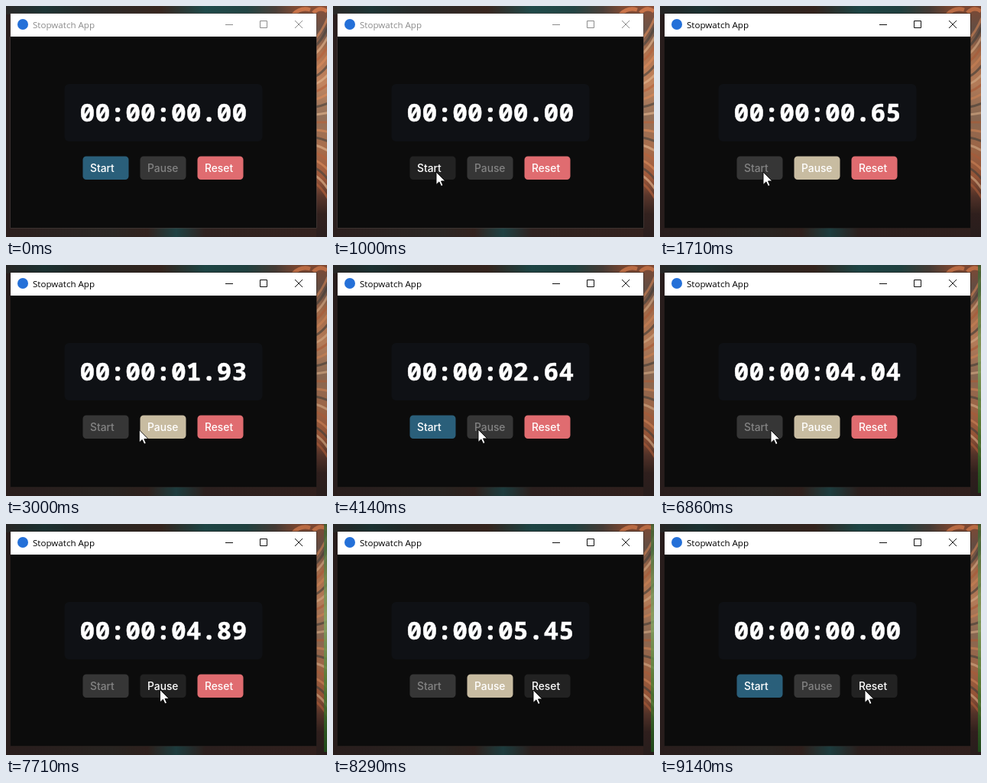
These frames come from a looping animation (420 by 302 pixels, 9.43 s). An HTML page:

```html
<!DOCTYPE html>
<html lang="en">
<head>
<meta charset="utf-8">
<title>Stopwatch App</title>
<style>
html, body { margin: 0; width: 100%; height: 100%; overflow: hidden; background: #251918; }
svg { display: block; width: 100%; height: 100%; }
text { white-space: pre; }
.title { font: 11.6px "Open Sans", sans-serif; }
.clock { font: bold 33px "Noto Sans Mono", monospace; letter-spacing: .1px; fill: #fff; stroke: #fff; stroke-width: .5; }
.label { font: 500 13.8px Inter, sans-serif; }
</style>
</head>
<body>
<svg viewBox="0 0 420 302">
  <defs>
    <linearGradient id="top">
      <stop offset="0" stop-color="#2a2827"/>
      <stop offset=".12" stop-color="#1d3535"/>
      <stop offset=".25" stop-color="#272a29"/>
      <stop offset=".48" stop-color="#38261f"/>
      <stop offset=".62" stop-color="#1f4a4a"/>
      <stop offset=".75" stop-color="#234544"/>
      <stop offset=".84" stop-color="#4a3f39"/>
      <stop offset=".9" stop-color="#7d4b35"/>
      <stop offset="1" stop-color="#8a4f37"/>
    </linearGradient>
    <linearGradient id="bottom">
      <stop offset="0" stop-color="#2c1f1e"/>
      <stop offset=".33" stop-color="#2b2724"/>
      <stop offset=".44" stop-color="#33231f"/>
      <stop offset=".53" stop-color="#1f4143"/>
      <stop offset=".62" stop-color="#2f2220"/>
      <stop offset="1" stop-color="#35231f"/>
    </linearGradient>
    <linearGradient id="side" x2="0" y2="1">
      <stop offset="0" stop-color="#8a4f37"/>
      <stop offset=".1" stop-color="#6a5349"/>
      <stop offset=".2" stop-color="#b0734f"/>
      <stop offset=".34" stop-color="#c2855f"/>
      <stop offset=".48" stop-color="#927059"/>
      <stop offset=".6" stop-color="#a86f4e"/>
      <stop offset=".74" stop-color="#a15a3b"/>
      <stop offset=".82" stop-color="#5a372c"/>
      <stop offset=".9" stop-color="#33221f"/>
      <stop offset="1" stop-color="#2b1f1e"/>
    </linearGradient>
    <linearGradient id="glow" x2="0" y2="1">
      <stop offset="0" stop-color="#3d6a35"/>
      <stop offset=".42" stop-color="#8fb56c"/>
      <stop offset=".7" stop-color="#4f8a38"/>
      <stop offset="1" stop-color="#1f5a1c"/>
    </linearGradient>
  </defs>

  <rect width="420" height="302" fill="#2b1f1e"/>
  <rect width="420" height="11" fill="url(#top)"/>
  <rect y="290" width="420" height="12" fill="url(#bottom)"/>
  <rect x="406" width="14" height="302" fill="url(#side)"/>
  <path d="M376 11Q386 1 398 5M402 9Q411 0 420 7" fill="none" stroke="#c9744a" stroke-width="5"/>
  <g id="fan" fill="none"></g>
  <rect id="strip" x="416" width="4" height="298" fill="url(#glow)" opacity=".8"/>
  <rect id="shade" width="420" height="302" fill="#000"/>

  <rect id="frame" x="5.5" y="9.5" width="401" height="281"/>
  <rect x="6" y="40" width="400" height="250" fill="#0c0c0c"/>
  <rect x="6" y="10" width="400" height="30" fill="#fff"/>
  <circle cx="22" cy="24" r="7" fill="#2470d8"/>
  <text id="title" class="title" x="35" y="29">Stopwatch App</text>
  <path id="controls" d="M287 24.5h10M332.5 19.5h9v9h-9zM378 19l10 10M388 19l-10 10" fill="none"/>

  <rect x="76.5" y="102" width="259" height="75" rx="6" fill="#0f1115"/>
  <text id="clock" class="clock" x="96.5" y="151"></text>
  <g id="buttons"></g>
  <path id="cursor" d="M0 0V16.5L3.9 12.9L6.5 18.6L9 17.5L6.5 11.9H11.8Z" fill="#fff" stroke="#000" stroke-width=".9"/>
</svg>
<script>
const LOOP = 9430, STEP = 1000 / 7, RATE = 0.993;
const START = 1054.7, PAUSE = 3710, RESUME = 5446.3, RESET = 8710;
const BUTTON_Y = 196.5, BUTTON_W = 60, BUTTON_H = 30.5;
const $ = id => document.getElementById(id);

// time, x, y
const PATH = [
  [350, 152, 306], [930, 135, 217], [2450, 135, 217], [3300, 190, 215],
  [4800, 190, 215], [5330, 145, 216], [7250, 145, 216], [8200, 262, 217],
  [8750, 262, 217], [9130, 268, 217]
];

function make(tag, parent, attrs) {
  const el = document.createElementNS("http://www.w3.org/2000/svg", tag);
  for (const key in attrs) el.setAttribute(key, attrs[key]);
  return parent.appendChild(el);
}

// Feathers of the wallpaper, spreading from behind the window
const FEATHERS = ["#d88a5a", "#4a443d", "#e0b48e", "#b5633d"];
for (let i = 0; i < 20; i++) {
  const y = 42 + i * 10, tilt = (i - 11) * 2.4;
  make("path", $("fan"), {
    d: `M405 ${y}Q413 ${y + tilt * 0.3} 421 ${y + tilt}`,
    stroke: FEATHERS[i % 4], "stroke-width": 3, opacity: 0.65
  });
}

const buttons = [["Start", 101, "#2a5f7a"], ["Pause", 176, "#c8bca1"], ["Reset", 251, "#e06c70"]]
  .map(([name, x, color]) => {
    const box = make("rect", $("buttons"), { x: x - 0.5, y: BUTTON_Y, width: BUTTON_W, height: BUTTON_H, rx: 4.5 });
    const label = make("text", $("buttons"), { x: x + 9, y: 217, class: "label" });
    label.textContent = name;
    return { x, color, box, label };
  });

function cursorAt(t) {
  const i = PATH.findIndex(p => p[0] > t);
  if (i === 0) return PATH[0].slice(1);
  if (i < 0) return PATH[PATH.length - 1].slice(1);
  const [a, b] = [PATH[i - 1], PATH[i]];
  const k = (t - a[0]) / (b[0] - a[0]), e = k * k * (3 - 2 * k);
  return [a[1] + (b[1] - a[1]) * e, a[2] + (b[2] - a[2]) * e];
}

function elapsed(t) {
  if (t < START || t >= RESET) return 0;
  if (t < RESUME) return Math.min((t - START) * RATE, 2640);
  return 2640 + (t - RESUME) * RATE;
}

function format(ms) {
  const two = n => String(Math.floor(n)).padStart(2, "0");
  return `${two(ms / 3600000)}:${two(ms / 60000 % 60)}:${two(ms / 1000 % 60)}.${two(ms / 10 % 100)}`;
}

function draw(time) {
  const t = Math.min(Math.floor((time % LOOP + 5) / STEP), 65) * STEP;
  const active = t >= START;
  const running = t >= START && t < PAUSE || t >= RESUME && t < RESET;
  const [cx, cy] = cursorAt(t);

  $("title").setAttribute("fill", active ? "#000" : "#8c8c8c");
  $("controls").setAttribute("stroke", active ? "#111" : "#8c8c8c");
  $("frame").setAttribute("fill", active ? "#201a19" : "#4a4341");
  $("shade").setAttribute("opacity", active ? 0.08 : 0);
  $("strip").setAttribute("visibility", t >= 4850 ? "visible" : "hidden");
  $("clock").textContent = format(elapsed(t));
  $("cursor").setAttribute("transform", `translate(${cx.toFixed(1)} ${cy.toFixed(1)})`);

  buttons.forEach(({ x, color, box, label }, i) => {
    const disabled = i === 0 && running || i === 1 && !running;
    const hover = cx >= x && cx < x + BUTTON_W && cy >= BUTTON_Y && cy < BUTTON_Y + BUTTON_H;
    box.setAttribute("fill", disabled ? "#363636" : hover ? "#222" : color);
    label.setAttribute("fill", disabled ? "#838383" : "#fff");
  });
}

const origin = performance.now();
function tick() {
  draw(performance.now() - origin);
  requestAnimationFrame(tick);
}
tick();
</script>
</body>
</html>
```
